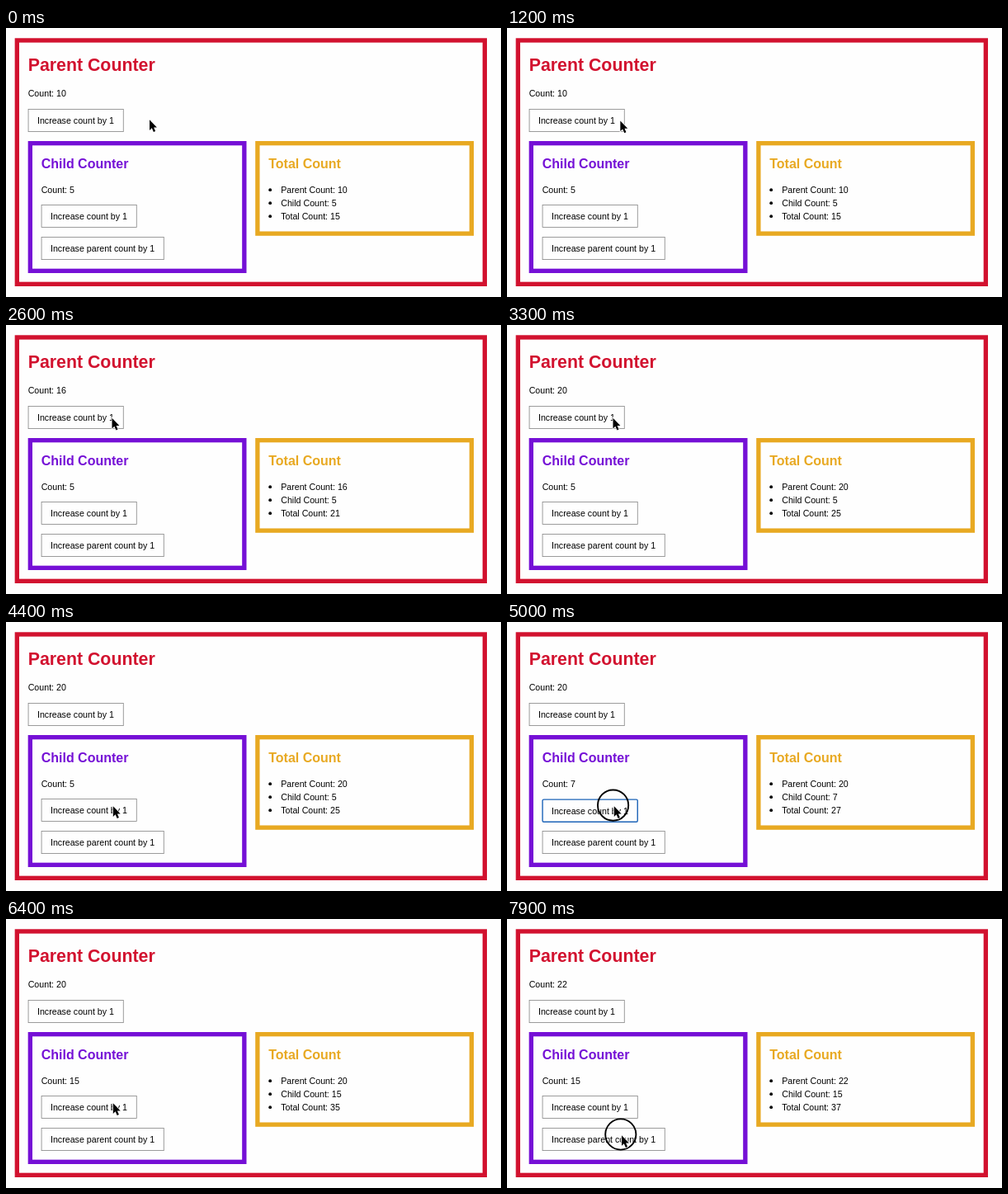
An HTML page for the animation above (8000 ms loop, 600x326 px).

```html
<!DOCTYPE html>
<html lang="en">
<head>
<meta charset="utf-8">
<title>Counters</title>
<style>
  html, body { margin: 0; width: 100%; height: 100%; overflow: hidden; background: #fefefe; }
  svg { display: block; width: 100%; height: 100%; }
  text { font: 10.667px "Liberation Sans", Arial, sans-serif; fill: #000; white-space: pre; }
  .title { font-size: 21.333px; font-weight: bold; }
  .subtitle { font-size: 16px; font-weight: bold; }
  .panel { fill: none; stroke-width: 5.333px; }
  .button rect { fill: #fefefe; stroke: #858585; stroke-width: .8px; }
  .button.active { transform: translateY(.7px); }
  .button.active rect { stroke: #1d64b8; stroke-width: 1.4px; rx: 1.5px; }
</style>
</head>
<body>
<svg id="stage" viewBox="0 0 600 326"></svg>
<script>
const LOOP = 8000;
const OUTLINE_DELAY = 30;
const RED = '#d2122f', PURPLE = '#7510d6', GOLD = '#e8a922';
const stage = document.getElementById('stage');

function add(tag, attrs, parent = stage) {
  const node = document.createElementNS('http://www.w3.org/2000/svg', tag);
  for (const key in attrs) node.setAttribute(key, attrs[key]);
  return parent.appendChild(node);
}

function label(x, y, content = '', attrs = {}, parent = stage) {
  const node = add('text', { x, y, ...attrs }, parent);
  node.textContent = content;
  return node;
}

function panel(left, top, right, bottom, stroke) {
  const half = 5.333 / 2;
  add('rect', {
    class: 'panel', stroke, x: left + half, y: top + half,
    width: right - left - 2 * half, height: bottom - top - 2 * half
  });
}

function button(x, y, width, content) {
  const group = add('g', { class: 'button' });
  add('rect', { x: x + .4, y: y + .4, width: width - .8, height: 27.2 }, group);
  label(x + 11.3, y + 18, content, {}, group);
  return group;
}

panel(10.67, 12.3, 583, 313, RED);
panel(26.67, 137, 291.5, 297, PURPLE);
panel(302.2, 137, 567, 251.8, GOLD);

label(26.67, 52, 'Parent Counter', { class: 'title', style: `fill:${RED}` });
label(42.67, 170, 'Child Counter', { class: 'subtitle', style: `fill:${PURPLE}` });
label(318.2, 170, 'Total Count', { class: 'subtitle', style: `fill:${GOLD}` });

const parentCount = label(26.67, 83.3);
const childCount = label(42.67, 199.5);
const listItems = [0, 1, 2].map(row => {
  const y = 199.5 + row * 16;
  add('circle', { cx: 320.2, cy: y - 3.3, r: 1.9 });
  return label(333.2, y);
});

const buttons = [
  button(26.67, 98, 116, 'Increase count by 1'),
  button(42.67, 214, 116, 'Increase count by 1'),
  button(42.67, 253, 149, 'Increase parent count by 1')
];

const pointer = add('g', {});
const ring = add('circle', { cx: -1.2, cy: -1.2, r: 18.6, fill: 'none', stroke: '#000', 'stroke-width': 1.9 }, pointer);
add('path', {
  d: 'M0 0V12.6L2.8 10 4.9 14.7 7.1 13.7 5.1 9.2H8.9Z',
  stroke: '#fff', 'stroke-width': 1.4, 'paint-order': 'stroke'
}, pointer);

// Evenly spaced presses of one button; each click counts on release.
const burst = (target, start, period, count) =>
  Array.from({ length: count }, (_, i) => ({
    target, down: start + i * period, up: start + i * period + 100
  }));

const presses = [
  ...burst(0, 1490, 190, 10),
  { target: 1, down: 4490, up: 4690 },
  ...burst(1, 4765, 175, 8),
  { target: 1, down: 6290, up: 6390 },
  { target: 2, down: 7390, up: 7590 },
  { target: 2, down: 7690, up: 7790 },
  { target: 2, down: 7880, up: 8000 }
];

const startPoint = [174, 111.3];
const moves = [
  { from: 950, to: 1300, point: [128.5, 112.8] },
  { from: 3750, to: 4400, point: [129.8, 223.3] },
  { from: 6750, to: 7200, point: [139, 262.2] }
];

function pointerAt(time) {
  let position = startPoint;
  for (const { from, to, point } of moves) {
    const p = Math.min(1, Math.max(0, (time - from) / (to - from)));
    const eased = p * p * (3 - 2 * p);
    position = position.map((v, i) => v + (point[i] - v) * eased);
  }
  return position;
}

function render(time) {
  const clicks = [0, 0, 0];
  for (const press of presses) if (time >= press.up) clicks[press.target]++;
  const parent = 10 + clicks[0] + clicks[2];
  const child = 5 + clicks[1];

  parentCount.textContent = `Count: ${parent}`;
  childCount.textContent = `Count: ${child}`;
  listItems[0].textContent = `Parent Count: ${parent}`;
  listItems[1].textContent = `Child Count: ${child}`;
  listItems[2].textContent = `Total Count: ${parent + child}`;

  const held = presses.find(p => time >= p.down && time < p.up);
  ring.setAttribute('visibility', held ? 'visible' : 'hidden');
  buttons.forEach((node, i) => node.classList.toggle('active',
    Boolean(held) && held.target === i && time >= held.down + OUTLINE_DELAY));
  pointer.setAttribute('transform', `translate(${pointerAt(time)})`);
}

const begin = performance.now();
function tick() {
  render((performance.now() - begin) % LOOP);
  requestAnimationFrame(tick);
}
tick();
</script>
</body>
</html>
```
